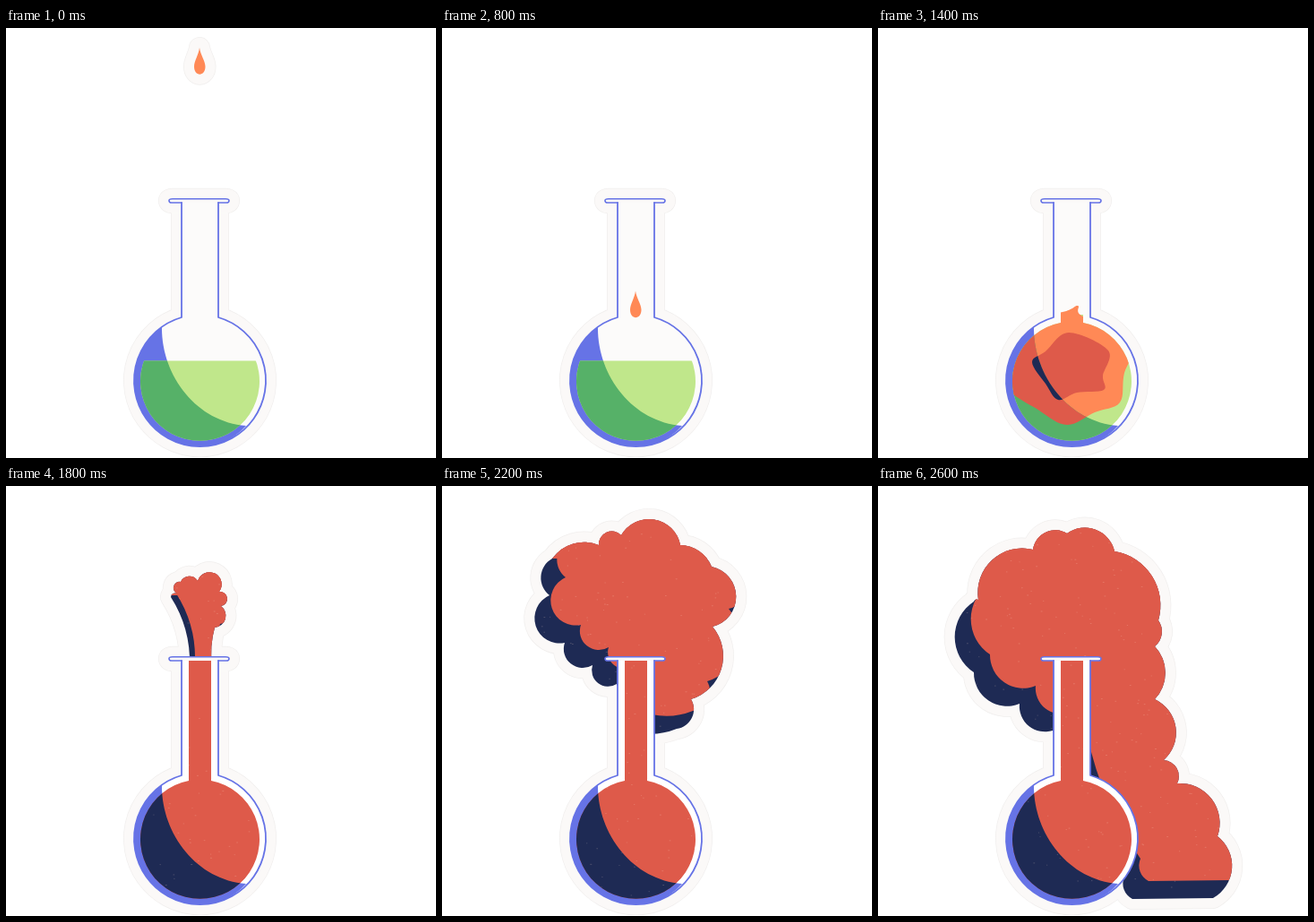
Recreate the animation shown at these times as an HTML page with a canvas. Size 480 px wide and 480 px high, loop 3200 ms.

```html
<!DOCTYPE html>
<html lang="en">
<head>
<meta charset="utf-8">
<title>Flask reaction</title>
<style>
  html, body { margin: 0; width: 100%; height: 100%; overflow: hidden; background: #fff; }
  canvas { display: block; width: 100vmin; height: 100vmin; }
</style>
</head>
<body>
<canvas width="480" height="480"></canvas>
<script>
const ctx = document.querySelector('canvas').getContext('2d');
const LOOP = 3200, STEP = 200, LAST = 13;
const PAPER = '#fbf9f8', EDGE = '#f0eeed', LINE = '#6673e6';
// Each paint has a lit and a shaded tone.
const GREEN = ['#c0e78b', '#56b168'];
const ORANGE = ['#ff8956', '#de5a4a'];
const RED = ['#de5a4a', '#1e2a54'];

// "x,y,bulge": bulge is sagitta / half chord of the arc that leads to the point.
const points = text => text.split(' ').map(p => {
  const [x, y, bulge = 0.54] = p.split(',').map(Number);
  return [x, y, bulge];
});
const mix = (a, b, t) => a.map((p, i) => p.map((v, k) => v + (b[i][k] - v) * t));

// Closed outline of arcs.
function bumps(list) {
  let [x, y] = list.at(-1), d = `M${x} ${y}`;
  for (const [u, v, b] of list) {
    const r = Math.abs(Math.hypot(u - x, v - y) / 4 * (b + 1 / b));
    d += b ? `A${r} ${r} 0 ${+(Math.abs(b) > 1)} ${+(b > 0)} ${u} ${v}` : `L${u} ${v}`;
    [x, y] = [u, v];
  }
  return new Path2D(d + 'Z');
}

// Smooth closed curve through the points.
function blob(text) {
  const p = points(text), n = p.length, path = new Path2D();
  path.moveTo(p[0][0], p[0][1]);
  for (let i = 0; i < n; i++) {
    const [a, b, c, d] = [n - 1, 0, 1, 2].map(k => p[(i + k) % n]);
    path.bezierCurveTo(b[0] + (c[0] - a[0]) / 6, b[1] + (c[1] - a[1]) / 6,
      c[0] - (d[0] - b[0]) / 6, c[1] - (d[1] - b[1]) / 6, c[0], c[1]);
  }
  return path;
}

function disc(x, y, rx, ry) {
  const path = new Path2D();
  path.ellipse(x, y, rx, ry, 0, 0, 2 * Math.PI);
  return path;
}

// Everything below a wavy surface.
function below(level, wave = 0) {
  const path = new Path2D();
  path.moveTo(140, 480);
  for (let x = 140; x <= 292; x += 2) path.lineTo(x, level - wave * Math.cos((x - 178) / 70 * 2 * Math.PI));
  path.lineTo(292, 480);
  return path;
}

function moved(path, x, y) {
  const copy = new Path2D();
  copy.addPath(path, new DOMMatrix([1, 0, 0, 1, x, y]));
  return copy;
}

const body = new Path2D('M196 195V323A73.5 73.5 0 1 0 237 323V195Z');
const outline = new Path2D('M196 195V323A73.5 73.5 0 1 0 237 323V195');
const rim = new Path2D('M196 195H185Q182 195 182 192.7Q182 190.8 186 190.8H245Q249 190.8 249 192.7Q249 195 246 195H237');
const inside = new Path2D('M204 195H229V329A66.5 66.5 0 1 1 204 329Z');
const shade = new Path2D('M174 333C173 388 213 440 268 444A73.5 73.5 0 1 1 174 333Z');
const drop = new Path2D('M0 0C1 8 6.5 15 6.5 21C6.5 32.5 -6 32.5 -6 21C-6 15 -1 8 0 0Z');
const dropTops = [22, 49, 102, 203, 293.5];

const still = [[below(371.5), GREEN]];
const boiled = [[below(190), RED]];
const reaction = {
  5: [[below(371, 2), GREEN], [disc(216, 367, 11, 11), ORANGE]],
  6: [
    [below(349.5, 5), GREEN],
    [blob('262,395 228,406 203,426 192,400 179,370 213,355 250,362 249,376'), ORANGE],
    [disc(217, 379, 11, 13), RED]
  ],
  7: [
    [below(320), GREEN],
    [blob('140,395 180,427 211,443 242,429 270,418 275,385 290,340 229,322 223,310 206,317 140,330'), ORANGE],
    [blob('213,340 257,360 251,388 252,404 222,407 201,415 187,397 172,373 187,361'), RED]
  ],
  8: [[below(251), ORANGE], [below(262), RED]]
};

const jet = points('230,200,-.1 205,200,0 184,124,-.15 191,120 195,107,.9 214,106,.6 238,118,1.2 240,134,1 233,158,.7');
const puff = points('216,275,.15 195,221,0 168,200,.7 137,175,.7 120,122,.9 123,81 175,66,.35 200,55,.7 266,66,.7 301,90,.3 302,157,.8 278,238');
const slump = points('216,300,.1 195,273,0 158,243 107,208 107,129 112,127 173,71 211,53 264,73 313,150,.45 309,179,.4 309,238,.4');
const tail = points('319,306 334,332 379,391 374,460 284,461,0 275,436,.4');
const tailTip = tail.map(([, , bulge]) => [262, 271, bulge]);

// The smoke shoots up, settles, then slumps while its tail pours out of one spot.
function smokeAt(pose) {
  if (pose < 9) return null;
  if (pose === 9) return { shape: bumps(jet), shadeTop: 122, shift: [6, -4] };
  const sag = Math.max(0, (pose - 11) / 2);
  const head = mix(puff, slump, sag);
  const [x, y] = pose === 10 ? [12, -25] : [0, 0];
  const shape = moved(bumps([...head, ...mix(tailTip, tail, sag)]), x, y);
  return { shape, shadeTop: head[5][1] + y, shift: [18, -20] };
}

function fill(path, colour) {
  ctx.fillStyle = colour;
  ctx.fill(path);
}

function stroke(path, colour, width) {
  ctx.strokeStyle = colour;
  ctx.lineWidth = width;
  ctx.stroke(path);
}

function clipped(path, paint) {
  ctx.save();
  ctx.clip(path);
  paint();
  ctx.restore();
}

// Sparse chalk specks, fixed for each pose.
function grain(seed) {
  const random = () => (seed = seed * 16807 % 2147483647) / 2147483647;
  ctx.fillStyle = 'rgba(255,225,205,.2)';
  for (let i = 0; i < 350; i++) ctx.fillRect(80 + random() * 320, 20 + random() * 445, 1 + random(), 1);
}

// The lit side is the same shape shifted away from the shade.
function drawSmoke({ shape, shadeTop, shift }, seed) {
  fill(shape, RED[1]);
  clipped(shape, () => {
    fill(moved(shape, ...shift), RED[0]);
    ctx.fillRect(0, 0, 480, shadeTop);
    grain(seed);
  });
}

function draw(pose) {
  const smoke = smokeAt(pose);
  const liquid = reaction[pose] || (smoke ? boiled : still);
  const falling = pose < dropTops.length ? moved(drop, 216, dropTops[pose]) : new Path2D();

  ctx.clearRect(0, 0, 480, 480);
  ctx.lineJoin = ctx.lineCap = 'round';
  const stickers = [body, rim, falling];
  if (smoke) stickers.push(smoke.shape);
  for (const [colour, width] of [[EDGE, 24], [PAPER, 22.6]])
    for (const path of stickers) {
      stroke(path, colour, width);
      fill(path, colour);
    }

  if (smoke) drawSmoke(smoke, pose * 97);
  fill(body, smoke ? '#fff' : '#fcfbfa');
  fill(rim, PAPER);
  clipped(body, () => fill(shade, LINE));
  clipped(inside, () => {
    for (const [path, tone] of liquid) fill(path, tone[0]);
    clipped(shade, () => { for (const [path, tone] of liquid) fill(path, tone[1]); });
    if (smoke) grain(pose * 31);
  });
  fill(falling, ORANGE[0]);
  stroke(outline, LINE, 1.8);
  stroke(rim, LINE, 1.6);
}

function tick(now) {
  draw(Math.min(LAST, Math.floor(now % LOOP / STEP)));
  requestAnimationFrame(tick);
}
tick(0);
</script>
</body>
</html>
```
